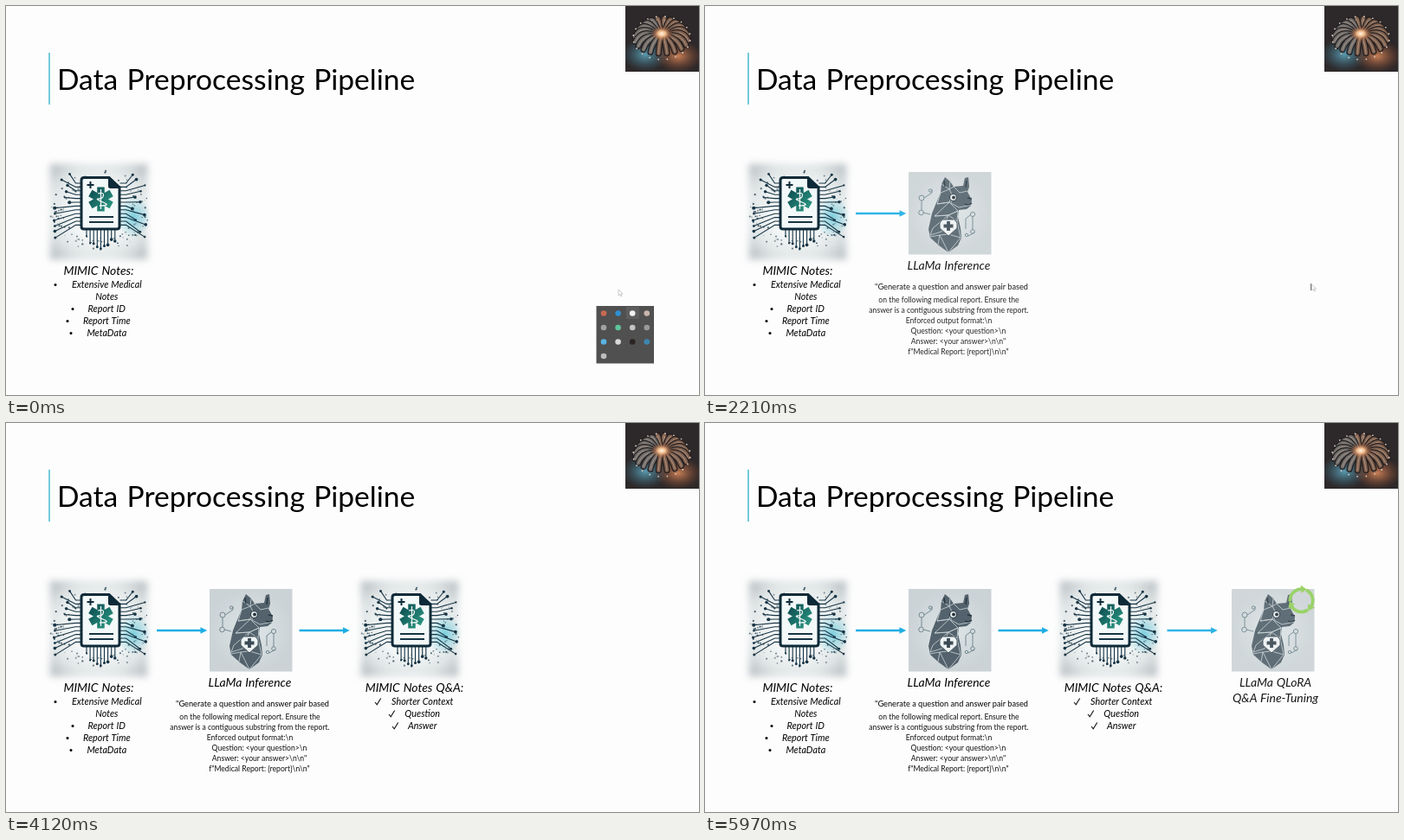
Write an HTML page that moves like this. It is 800 px wide and 450 px high and loops after 6000 ms.

```html
<!DOCTYPE html>
<html lang="en">
<head>
<meta charset="utf-8">
<title>Data Preprocessing Pipeline</title>
<style>
html, body { margin: 0; height: 100%; overflow: hidden; background: #fdfdfd; }
svg { display: block; width: 100vw; height: 100vh; }
text { font-family: Lato, Carlito, sans-serif; fill: #000; }
.mid { text-anchor: middle; }
.head { font-size: 13.9px; font-style: italic; text-anchor: middle; word-spacing: .7px; }
.item { font-size: 10.8px; font-style: italic; text-anchor: middle; word-spacing: .4px; }
.prompt { font-size: 8.6px; text-anchor: middle; fill: #111; }
</style>
</head>
<body>
<svg viewBox="0 0 800 450">
  <defs>
    <filter id="soft" x="-20%" y="-20%" width="140%" height="140%"><feGaussianBlur stdDeviation="4"/></filter>
    <radialGradient id="paper" r=".72">
      <stop offset=".35" stop-color="#f6f9f9"/><stop offset=".7" stop-color="#dfe4e5"/><stop offset="1" stop-color="#aab2b6"/>
    </radialGradient>
    <radialGradient id="teal"><stop stop-color="#58c4d8" stop-opacity=".75"/><stop offset="1" stop-color="#58c4d8" stop-opacity="0"/></radialGradient>
    <radialGradient id="mist"><stop stop-color="#dfe6e8"/><stop offset="1" stop-color="#ccd3d6"/></radialGradient>
    <linearGradient id="star" x2="1" y2="1"><stop stop-color="#0d4a50"/><stop offset="1" stop-color="#2c9c84"/></linearGradient>
    <radialGradient id="blue"><stop stop-color="#5fa6bd" stop-opacity=".9"/><stop offset="1" stop-color="#3a7085" stop-opacity="0"/></radialGradient>
    <radialGradient id="amber"><stop stop-color="#d98a5c" stop-opacity=".9"/><stop offset="1" stop-color="#8a4a30" stop-opacity="0"/></radialGradient>
    <radialGradient id="glow"><stop stop-color="#fff6e6"/><stop offset=".35" stop-color="#f0b888"/><stop offset="1" stop-color="#a05030" stop-opacity="0"/></radialGradient>
    <clipPath id="frame"><rect x="715" width="85" height="76"/></clipPath>

    <g id="arrow" fill="#1cade4"><path d="M174 238.8h52v2.4h-52z"/><path d="M224.5 236.2l7.8 3.8-7.8 3.8z"/></g>

    <g id="notes">
      <rect x="51" y="183" width="112" height="110" fill="url(#paper)" filter="url(#soft)"/>
      <ellipse cx="147" cy="244" rx="20" ry="24" fill="url(#teal)"/>
      <g id="traces" fill="#173444" stroke="#173444"></g>
      <path d="M90 198.5h29l12 11.5v45q0 3-3 3h-38q-3 0-3-3v-53.5q0-3 3-3z" fill="#f3f8f8" stroke="#0e2a38" stroke-width="3"/>
      <path d="M118 198l13.5 13h-11q-2.500 0-2.500-2.500z" fill="#0e2a38"/>
      <path d="M97.500 203v8M93.500 207h8" stroke="#0e2a38" stroke-width="2"/>
      <path id="spokes" stroke="url(#star)" stroke-width="8.500"/>
      <path d="M109.500 212v23M106 217q7-2 6.500 2t-5.500 4 5 4-4 4" fill="none" stroke="#f3f8f8" stroke-width="1.300"/>
      <path d="M96 244h28M96 250h28" stroke="#173444" stroke-width="1.900"/>
    </g>

    <g id="llama">
      <rect x="235" y="192" width="95.500" height="95.500" fill="url(#mist)"/>
      <g fill="none" stroke="#718991" stroke-width="1">
        <path d="M250 225v11M253 222l9-6v-4M252 239l8 2M309 244v15M306 242l-5 4v12M311 262l-7 4"/>
        <circle cx="250" cy="222" r="3"/><circle cx="249.500" cy="239" r="2.800"/><circle cx="260" cy="213.500" r="1.700"/>
        <circle cx="309" cy="241" r="2.600"/><circle cx="309" cy="261" r="2.300"/><circle cx="302" cy="265" r="1.700"/>
      </g>
      <path d="M272 216l1-10 4-8 6 5 4 6 11-1 2-9 4-1 1 11-2 6 5 9-1 7-5 4-9 1-1 8 3 13 1 11-4 9-11 8-11-8-10-9-2-10 4-18 4-10z" fill="#53626c"/>
      <path d="M273 206l9 6 5-3 7 7 9-2M272 216l10-4 3 6-3 9-14 2 4-13M268 229l14-2 10 10-11 5-16 1 17-16M265 243l16-1 11-5-1 12-10-7-18 15-3 8 13-4 8-19M291 249l4 19-14-4-10 1 10 20 14-17M260 267l11-2-2 11M285 218l-1 10 9 5 15-3M283 203l-1 9" fill="none" stroke="#c6d0d4" stroke-width=".85"/>
      <path d="M303 222l5 1M300 229q5 2 8-1M276 202l1 7M302 202l-1 8" stroke="#26343e" stroke-width="1.300" fill="none"/>
      <circle cx="286.500" cy="221.500" r="4" fill="#e8eeee" stroke="#2d3b45" stroke-width="1.200"/><circle cx="287" cy="221.500" r="1.900" fill="#25323b"/>
      <path d="M274 247h14l3 4v6l-10 9-10-9v-6z" fill="#eef3f3" stroke="#46545e"/>
      <path d="M281 249v11M275.500 254.500h11" stroke="#3b4a54" stroke-width="3.800"/>
    </g>
  </defs>

  <rect width="800" height="450" fill="#fdfdfd"/>
  <path d="M50 54v60" stroke="#74cbd8" stroke-width="2"/>
  <text x="59" y="97" font-size="33.600" word-spacing="1.700">Data Preprocessing Pipeline</text>

  <g clip-path="url(#frame)">
    <rect x="715" width="85" height="76" fill="#2d2829"/>
    <ellipse cx="738" cy="56" rx="27" ry="20" fill="url(#blue)"/>
    <ellipse cx="776" cy="58" rx="28" ry="19" fill="url(#amber)"/>
    <g id="bands" fill="none" stroke-linecap="round"></g>
    <ellipse cx="757" cy="32" rx="13" ry="9" fill="url(#glow)"/>
  </g>

  <use href="#notes"/>
  <g id="first"></g>
  <g id="step1"><use href="#arrow"/><use href="#llama"/></g>
  <g id="step2"><use href="#arrow" x="164.500"/><use href="#notes" x="359"/></g>
  <g id="step3">
    <use href="#arrow" x="359.500"/><use href="#llama" x="373"/>
    <g id="cycle" transform="translate(688.500 205.300)"></g>
  </g>
  <g id="tray"><rect x="681.500" y="347" width="66.500" height="66.500" fill="#505050"/><rect x="716" y="348" width="15" height="14" fill="#5e5e5e"/></g>
  <g id="bar" fill="none" stroke="#d9d9d9" stroke-width=".9"></g>
  <g id="cursor"><path d="M0 0v7l1.700-1.600 1.300 2.600 1-.5-1.200-2.500h2.300z" fill="#fff" stroke="#b5b5b5" stroke-width=".7"/><path id="beam" d="M-1-1v8" stroke="#777" stroke-width="1"/></g>
</svg>
<script>
const $ = id => document.getElementById(id);
const add = (id, markup) => $(id).insertAdjacentHTML('beforeend', markup);
const esc = s => s.replace(/&/g, '&amp;').replace(/</g, '&lt;');
const label = (id, kind, x, y, s) => add(id, `<text class="${kind}" x="${x}" y="${y}">${esc(s)}</text>`);
const dot = (x, y, r, more = '') => `<circle cx="${x}" cy="${y}" r="${r}" ${more}/>`;
let seed = 11;
const rnd = () => (seed = seed * 16807 % 2147483647) / 2147483647;

// Captions
label('first', 'head', 107, 311, 'MIMIC Notes:');
['Extensive Medical', 'Notes', 'Report ID', 'Report Time', 'MetaData'].forEach((s, i) =>
  label('first', 'item', 116.3, 326 + 14 * i, s));
[[57, 322.5], [77, 350.5], [71, 364.5], [75, 378.5]].forEach(([x, y]) => add('first', dot(x, y, 1.5)));

label('step1', 'head', 281.5, 305, 'LLaMa Inference');
add('step1', '<text class="mid" x="284.5" y="328" font-size="9.2">"Generate a question and answer pair based</text>');
[[281.5, 342.5, 'on the following medical report. Ensure the'],
 [281.5, 354.5, 'answer is a contiguous substring from the report.'],
 [281.5, 366.5, 'Enforced output format:\\n'],
 [292.5, 378.5, 'Question: <your question>\\n'],
 [292.5, 390.5, 'Answer: <your answer>\\n\\n"'],
 [292.5, 402.5, 'f"Medical Report: {report}\\n\\n"']
].forEach(line => label('step1', 'prompt', ...line));

label('step2', 'head', 471.5, 311, 'MIMIC Notes Q&A:');
[['Shorter Context', 429], ['Question', 445], ['Answer', 449]].forEach(([s, x], i) => {
  label('step2', 'item', 480.7, 326 + 14 * i, s);
  add('step2', `<path d="M${x - 3} ${323 + 14 * i}l2.200 2.800 4.500-7.300" fill="none" stroke="#111" stroke-width="1.100"/>`);
});

label('step3', 'head', 658.5, 305, 'LLaMa QLoRA');
label('step3', 'head', 658.5, 323, 'Q&A Fine-Tuning');

// Circuit traces around the document
const trace = (d, x, y, r) => add('traces', `<path d="${d}L${x} ${y}" fill="none" stroke-width="1.100"/>` + dot(x, y, r, 'stroke="none"'));
for (let i = 0; i < 12; i++) {
  const y = 205 + i * 4.4, end = 231 + (y - 230) * 1.5;
  for (const side of [-1, 1]) {
    const x = 109.5 + side * (36 + rnd() * 18);
    trace(`M${109.5 + side * 22} ${y}h${side * 7}`, x, end + rnd() * 2, 1 + rnd() * 1.2);
  }
}
for (let i = 0; i < 9; i++) trace(`M${93 + i * 4.1} 259`, 93 + i * 4.1, 266 + (4 - Math.abs(i - 4)) * 3.5 + rnd() * 6, 1 + rnd() * .9);
for (let i = 0; i < 110; i++) {
  const a = rnd() * 6.283, r = 38 + rnd() * 20;
  add('traces', dot(109 + Math.cos(a) * r, 236 + Math.sin(a) * r * .85, .4 + rnd() * .8, `stroke="none" opacity="${.4 + rnd() * .5}"`));
}
$('spokes').setAttribute('d', [30, 90, 150].map(deg => {
  const a = deg * Math.PI / 180, x = 14 * Math.cos(a), y = 14 * Math.sin(a);
  return `M${109.5 - x} ${223.5 - y}L${109.5 + x} ${223.5 + y}`;
}).join(''));

// Ring of metal bands, back to front
const bands = Array.from({ length: 20 }, (_, i) => i * Math.PI / 10 + .12).sort((a, b) => Math.sin(a) - Math.sin(b));
for (const a of bands) {
  const c = Math.cos(a), s = Math.sin(a);
  const d = `M${757 + 9 * c} ${32 + 5 * s}Q${757 + 25 * c} ${24 + 19 * s} ${757 + 31 * c} ${38 + 17 * s}`;
  add('bands', `<path d="${d}" stroke="#241f20" stroke-width="7"/><path d="${d}" stroke="${c < -.2 ? '#6e6d6c' : '#80614f'}" stroke-width="4.500"/>` +
    `<path d="${d}" stroke="#b59b88" stroke-width=".8"/>` + dot(757 + 33 * c, 37 + 25 * s, .9, 'fill="#ddd0c5"'));
}

// Three chasing arrows
for (let i = 0; i < 3; i++) add('cycle', `<g transform="rotate(${i * 120 - 65})">
  <path d="M13.200 0A13.200 13.200 0 0 1-1.600 13.100" fill="none" stroke="#92cf5c" stroke-width="3.800"/>
  <path d="M-.8 8.500v9.200l-6.400-5.600z" fill="#92cf5c"/></g>`);

// Tray icons
['#c66a50', '#2f8fd0', '#f2f2f2', '#c9b4ae', '#a0a0a0', '#5fc49b', '#c4c4c4', '#999', '#58b5e2', '#d8d8d8', '#2a2422', '#3d86b0', '#bcbcbc']
  .forEach((fill, i) => add('tray', dot(690 + i % 4 * 16.6, 355.5 + (i >> 2) * 16.5, 3.3, `fill="${fill}"`)));

// Slide show buttons
['M2-2l-3 2 3 2', 'M-2-2l3 2-3 2', 'M-2 2l4-4', 'M-2-2h3v3h-3zM0 0h2v2h-2z', 'M-2 0a1.500 1.500 0 1 1 3 0 1.500 1.500 0 1 1-3 0M1 1l2 2',
 'M-2.500-1.500h5v3h-5z', 'M-2.500-1.500h3.500v3h-3.500zM1 0l2-1.500v3z', 'M-2 0h1M0 0h1M2 0h1'].forEach((d, i) =>
  add('bar', `<g transform="translate(${8 + i * 15.8} 441.500)">${dot(0, 0, 4.6)}<path d="${d}" ${i === 6 ? 'stroke="#777" fill="#888"' : ''}/></g>`));

const ramp = (t, start, span) => Math.min(1, Math.max(0, (t - start) / span));
const show = (id, v) => $(id).setAttribute('opacity', +v);

function draw(now) {
  const t = now % 6000;
  show('step1', ramp(t, 1670, 600));
  show('step2', ramp(t, 3520, 600));
  show('step3', ramp(t, 5420, 600));
  show('tray', 1 - ramp(t, 30, 120));
  show('bar', (t >= 30 && t < 1670) || (t >= 2300 && t < 3330));
  show('cursor', t < 3330);
  show('beam', t >= 670);
  const k = ramp(t, 30, 580);
  $('cursor').setAttribute('transform', `translate(${707 - 6.5 * k} ${328 - 6 * k})`);
  requestAnimationFrame(draw);
}
requestAnimationFrame(draw);
</script>
</body>
</html>
```
